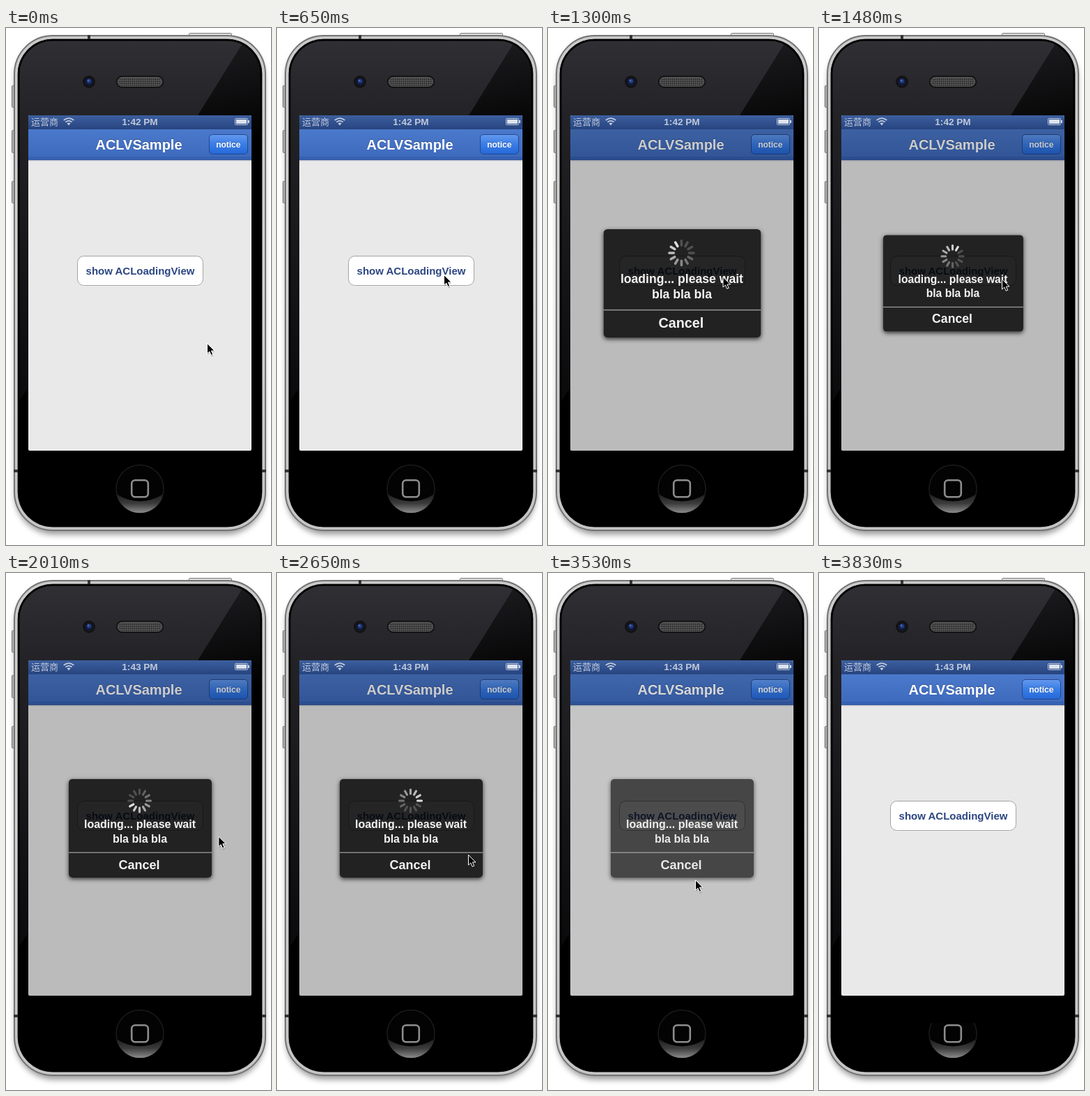
These frames come from a looping animation (380x740 px, 4430 ms). An HTML page:

```html
<!DOCTYPE html>
<html lang="en">
<head>
<meta charset="utf-8">
<title>ACLVSample</title>
<style>
html, body { margin: 0; width: 100%; height: 100%; overflow: hidden; background: #fff; }
#stage { position: absolute; left: 0; top: 0; width: 380px; height: 740px; overflow: hidden; }
svg { position: absolute; left: 0; top: 0; overflow: visible; }
text { font-family: "Liberation Sans", Arial, sans-serif; font-weight: bold; text-anchor: middle; }
#alert {
  position: absolute; left: 90px; top: 295px; width: 205px; height: 141px;
  border-radius: 5px; background: rgba(0, 0, 0, .82);
  box-shadow: 0 2px 6px rgba(0, 0, 0, .75);
}
</style>
</head>
<body>
<div id="stage">
<svg width="380" height="740">
  <defs>
    <linearGradient id="rim" x2="0" y2="1">
      <stop offset="0" stop-color="#c9cac9"/><stop offset=".5" stop-color="#d2d3d2"/><stop offset="1" stop-color="#c4c5c4"/>
    </linearGradient>
    <linearGradient id="gloss" gradientUnits="userSpaceOnUse" x1="0" y1="16" x2="0" y2="540">
      <stop offset="0" stop-color="#2f2f34"/><stop offset=".21" stop-color="#232327"/><stop offset="1" stop-color="#0a0a0c"/>
    </linearGradient>
    <linearGradient id="shade" gradientUnits="userSpaceOnUse" x1="300" y1="16" x2="330" y2="170">
      <stop offset="0" stop-color="#1d1d20"/><stop offset="1" stop-color="#000"/>
    </linearGradient>
    <linearGradient id="status" x2="0" y2="1">
      <stop offset="0" stop-color="#3c5f9f"/><stop offset="1" stop-color="#27447f"/>
    </linearGradient>
    <linearGradient id="nav" x2="0" y2="1">
      <stop offset="0" stop-color="#4b79cb"/><stop offset="1" stop-color="#3d69bb"/>
    </linearGradient>
    <linearGradient id="notice" x2="0" y2="1">
      <stop offset="0" stop-color="#6499ee"/><stop offset=".5" stop-color="#3a7de6"/><stop offset="1" stop-color="#2468d8"/>
    </linearGradient>
    <linearGradient id="press" x2="0" y2="1">
      <stop offset="0" stop-color="#058cf5"/><stop offset="1" stop-color="#015de6"/>
    </linearGradient>
    <linearGradient id="crescent" x2="0" y2="1">
      <stop offset="0" stop-color="#1c1c1c"/><stop offset=".5" stop-color="#3c3c3c"/><stop offset="1" stop-color="#8c8c8c"/>
    </linearGradient>
    <linearGradient id="key" x2="1" y2="0">
      <stop offset="0" stop-color="#999"/><stop offset="1" stop-color="#eee"/>
    </linearGradient>
    <pattern id="mesh" width="3" height="3" patternUnits="userSpaceOnUse">
      <rect width="3" height="3" fill="#555"/><circle cx="1.5" cy="1.5" r="1" fill="#222"/>
    </pattern>
    <clipPath id="face"><rect x="17" y="16" width="350" height="698" rx="50"/></clipPath>
    <clipPath id="glass"><rect x="32" y="125" width="320" height="480" rx="2"/></clipPath>
    <filter id="soft" x="-10%" y="-10%" width="120%" height="120%"><feGaussianBlur stdDeviation="4"/></filter>
  </defs>

  <!-- body -->
  <rect x="13" y="16" width="358" height="709" rx="56" fill="#000" opacity=".4" filter="url(#soft)"/>
  <g fill="url(#key)" stroke="#777" stroke-width="1">
    <rect x="8.5" y="82.5" width="5" height="31" rx="1"/>
    <rect x="8.5" y="146.5" width="5" height="32" rx="1"/>
    <rect x="8.5" y="219.5" width="5" height="31" rx="1"/>
    <rect x="262.5" y="7.500" width="61" height="5" rx="1" fill="#ddd"/>
  </g>
  <rect x="12" y="11" width="360" height="708" rx="55" fill="url(#rim)" stroke="#727372" stroke-width="2"/>
  <path d="M119 10v7M11 634h7M366 634h7" stroke="#333" stroke-width="4"/>
  <rect x="17" y="16" width="350" height="698" rx="50" fill="#000" stroke="#3a3a3a" stroke-width="1"/>
  <g clip-path="url(#face)">
    <path d="M17 16H367V190H17Z" fill="url(#shade)"/>
    <path d="M17 16H343L17 538Z" fill="url(#gloss)"/>
    <rect x="18" y="17" width="348" height="696" rx="49" fill="none" stroke="#000" stroke-width="3"/>
  </g>
  <circle cx="119" cy="77" r="9" fill="#131316"/>
  <circle cx="119" cy="77" r="5.500" fill="#121a3a"/>
  <circle cx="119" cy="76" r="3" fill="#253f86"/>
  <circle cx="118" cy="75" r="1" fill="#6480c0"/>
  <rect x="158" y="68.500" width="68" height="17" rx="8.500" fill="#0a0a0b" stroke="#1a1a1c"/>
  <rect x="160" y="70.500" width="64" height="13" rx="6.500" fill="url(#mesh)" stroke="#666" stroke-width=".8"/>

  <!-- home button -->
  <circle cx="192" cy="659.500" r="34" fill="#030303" stroke="#1b1b1b" stroke-width="1.500"/>
  <path d="M158.300 667A34.500 34.500 0 0 0 225.700 667Q192 688 158.300 667Z" fill="url(#crescent)"/>
  <rect id="ringCover" x="155" y="622" width="74" height="22"/>
  <rect x="180.200" y="647.200" width="23.600" height="24" rx="5" fill="none" stroke="#8d8d8d" stroke-width="2.600"/>

  <!-- screen -->
  <g clip-path="url(#glass)">
    <rect x="32" y="125" width="320" height="480" fill="#e9e9e9"/>
    <rect x="32" y="125" width="320" height="20" fill="url(#status)"/>
    <rect x="32" y="145" width="320" height="44" fill="url(#nav)"/>
    <rect x="32" y="184" width="320" height="4" fill="#3561b3" opacity=".8"/>
    <rect x="32" y="188" width="320" height="1" fill="#2f559f"/>
    <rect x="32" y="189" width="320" height="1" fill="#b4bccb"/>
    <rect x="32" y="190" width="320" height="1" fill="#dbdde1"/>
    <g fill="#bfc9dc">
      <text x="55.500" y="139" style="font:13px 'Noto Sans CJK SC','Noto Sans CJK',sans-serif">运营商</text>
      <text id="clock" x="192" y="139" font-size="13.600"></text>
      <path d="M90 139.500L87.500 136.500Q90 134.500 92.500 136.500Z"/>
      <path d="M85.300 134.700Q90 130.900 94.700 134.700M82.700 132Q90 126.200 97.300 132" fill="none" stroke="#bfc9dc" stroke-width="1.700"/>
      <rect x="328.500" y="129.500" width="18" height="9" rx="1" fill="none" stroke="#bfc9dc"/>
      <rect x="330" y="131" width="15" height="6" fill="#dbe2ee"/>
      <rect x="347" y="132" width="2" height="4"/>
    </g>
    <text x="190.500" y="173" font-size="20" fill="#1f3b74" opacity=".7">ACLVSample</text>
    <text x="190.500" y="174" font-size="20" fill="#fff">ACLVSample</text>
    <rect x="291.500" y="152.500" width="55" height="28" rx="4.500" fill="url(#notice)" stroke="#23478e"/>
    <text x="318.800" y="170" font-size="12" fill="#17438f" opacity=".6">notice</text>
    <text x="318.800" y="171" font-size="12" fill="#fff">notice</text>
    <rect x="102.500" y="327.500" width="180" height="42" rx="9" fill="#f8f8f8"/>
    <rect id="button" x="102.500" y="326.500" width="180" height="42" rx="9" stroke="#a3a3a3"/>
    <text id="label" x="192.500" y="353" font-size="15">show ACLoadingView</text>
    <rect id="dim" x="32" y="145" width="320" height="460"/>
  </g>
</svg>

<div id="alert">
  <svg width="205" height="141" fill="#f4f4f4">
    <g id="spinner" transform="translate(101.500 31)"></g>
    <text x="102" y="70" font-size="16">loading... please wait</text>
    <text x="102" y="90.500" font-size="16">bla bla bla</text>
    <rect y="104.500" width="205" height="1.300" fill="#999"/>
    <text x="101" y="128.500" font-size="18">Cancel</text>
  </svg>
</div>

<svg width="380" height="740">
  <g id="cursor">
    <path d="M1 2V17L4.300 14 6.800 19.500 9.300 18.400 6.900 13H11.500Z" fill="#000" opacity=".2"/>
    <path d="M.5 .5V15L3.800 12 6.200 17.300 8.700 16.200 6.400 11H11Z" fill="#000" stroke="#fff"/>
  </g>
</svg>
</div>

<script>
const $ = id => document.getElementById(id);
const LOOP = 4430, START = 355, STEP = 58.75;

// Rows: tick, value...
const cursorPath = [
  [-1, 288, 451], [2, 268, 410], [5, 239, 353], [13, 239, 353], [19, 262, 359],
  [22, 282, 367], [26, 304, 376], [32, 305, 378], [36, 296, 391], [39, 274, 403],
  [41, 232, 410], [43, 185, 412], [46, 163, 413], [52, 163, 413], [53, 180, 422],
  [54, 211, 439], [55, 245, 500], [56, 285, 576], [57, 322, 655], [58, 349, 722]
];
const zoom = [[13, .18], [14, .62], [15, 1.02], [16, 1.1], [17, 1.01], [18, .93], [19, .98], [20, 1]];
const fade = [[52, 1], [53, .95], [54, .79], [55, .52], [56, .25], [57, .07], [58, 0]];

function sample(rows, n) {
  const i = rows.findIndex(r => r[0] >= n);
  if (i < 0) return rows[rows.length - 1].slice(1);
  if (i === 0) return rows[0].slice(1);
  const a = rows[i - 1], b = rows[i], k = (n - a[0]) / (b[0] - a[0]);
  return a.slice(1).map((v, j) => v + (b[j + 1] - v) * k);
}

const spokes = Array.from({ length: 12 }, (_, i) => {
  const el = document.createElementNS("http://www.w3.org/2000/svg", "rect");
  const attrs = { x: -1.6, y: -17.5, width: 3.2, height: 9, rx: 1.6, transform: `rotate(${i * 30})` };
  for (const k in attrs) el.setAttribute(k, attrs[k]);
  return $("spinner").appendChild(el);
});

function draw(t) {
  const n = Math.floor((t - START) / STEP);
  const pressed = n >= 10 && n < 13;
  const open = n >= 13 && n < 58;
  const [alpha] = sample(fade, n), [scale] = sample(zoom, n);
  const [x, y] = sample(cursorPath, n);

  $("cursor").setAttribute("transform", `translate(${x} ${y})`);
  $("cursor").style.display = n < 59 ? "" : "none";
  $("button").setAttribute("fill", pressed ? "url(#press)" : "#fff");
  $("label").setAttribute("fill", pressed ? "#fff" : "#2c4682");
  $("clock").textContent = n < 21 ? "1:42 PM" : "1:43 PM";
  $("dim").style.opacity = open ? .2 * alpha : 0;
  $("alert").style.opacity = open ? alpha : 0;
  $("alert").style.transform = `scale(${scale})`;
  $("ringCover").style.display = n < 59 ? "none" : "";

  $("spinner").style.display = n < 52 ? "" : "none";
  const head = Math.floor((START + n * STEP + 5) * .012) + 8;
  spokes.forEach((s, i) => {
    const age = (((head - i) % 12) + 12) % 12;
    s.style.opacity = Math.max(.22, .9 - age * .085);
  });
}

const t0 = performance.now();
function loop() {
  draw((performance.now() - t0) % LOOP);
  requestAnimationFrame(loop);
}
loop();
</script>
</body>
</html>
```
